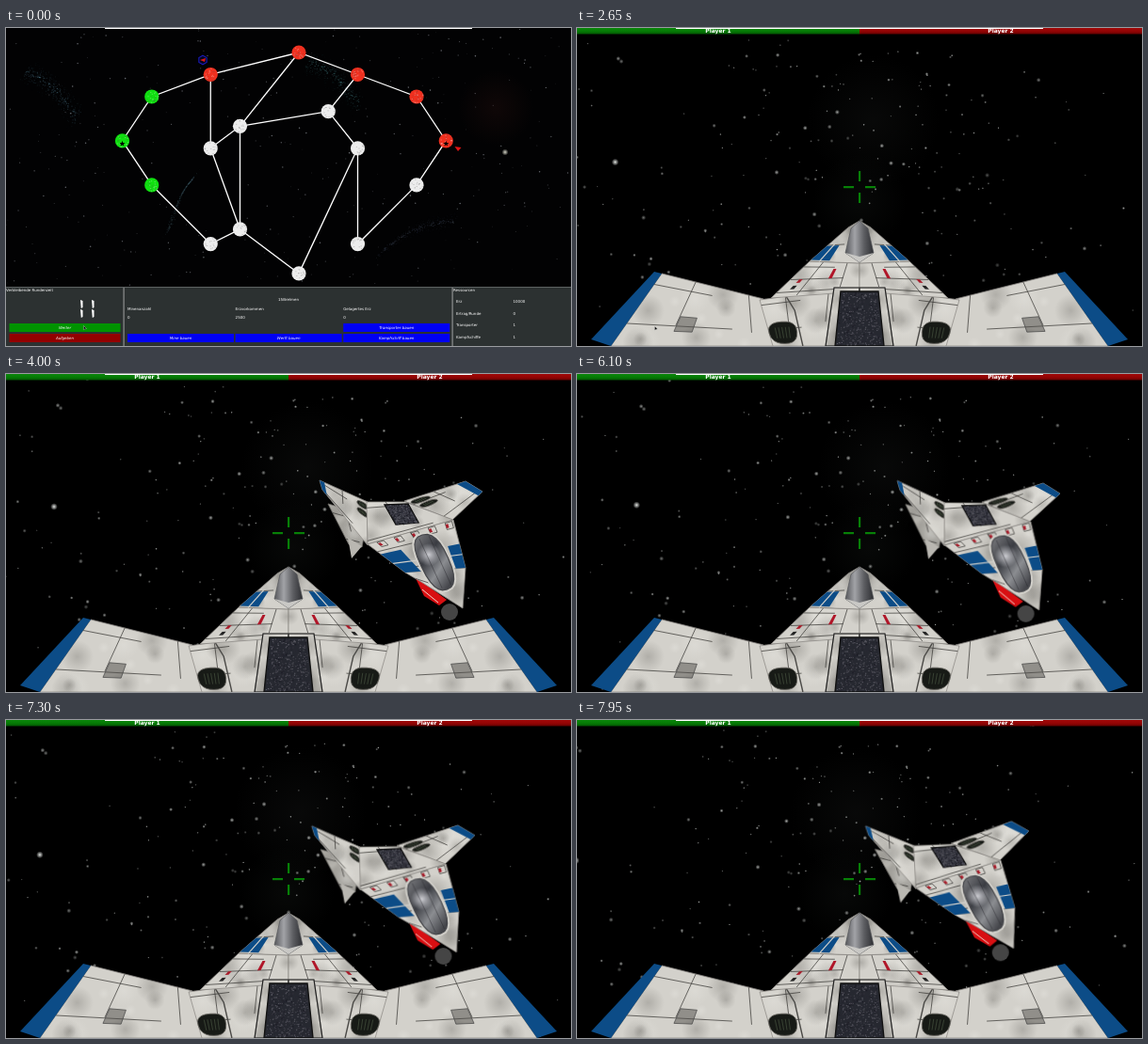
These frames come from a looping animation (600 by 338 pixels, 8 s). An HTML page with a canvas:

```html
<!DOCTYPE html>
<html lang="de">
<head>
<meta charset="utf-8">
<title>Raumschlacht</title>
<style>
html, body { margin: 0; width: 100%; height: 100%; overflow: hidden; background: #000; }
canvas { display: block; width: 600px; height: 338px; }
</style>
</head>
<body>
<canvas id="stage" width="600" height="338"></canvas>
<script>
const W = 600, H = 338, LOOP = 8000, FOCAL = 230;
const BLUE = '#0c4c87', HULL = '#d3d1cb', INK = '#33322f';
const ctx = document.getElementById('stage').getContext('2d');

// ---- helpers ----
function seeded(s) {
  return () => (s = (s * 16807) % 2147483647) / 2147483647;
}

function layer(draw) {
  const c = document.createElement('canvas');
  c.width = W;
  c.height = H;
  draw(c.getContext('2d'));
  return c;
}

function trace(g, p) {
  g.beginPath();
  for (let i = 0; i < p.length; i += 2) g.lineTo(p[i], p[i + 1]);
}

function poly(g, p, fill, stroke, width = 0.7) {
  trace(g, p);
  g.closePath();
  if (fill) { g.fillStyle = fill; g.fill(); }
  if (stroke) { g.strokeStyle = stroke; g.lineWidth = width; g.stroke(); }
}

function line(g, p, color = INK, width = 0.7) {
  trace(g, p);
  g.strokeStyle = color;
  g.lineWidth = width;
  g.stroke();
}

function rect(g, x, y, w, h, fill) {
  g.fillStyle = fill;
  g.fillRect(x, y, w, h);
}

function disc(g, x, y, r, fill) {
  g.fillStyle = fill;
  g.beginPath();
  g.arc(x, y, r, 0, 7);
  g.fill();
}

function glow(g, x, y, r, rgb, a) {
  const f = g.createRadialGradient(x, y, 0, x, y, r);
  f.addColorStop(0, `rgba(${rgb},${a})`);
  f.addColorStop(1, `rgba(${rgb},0)`);
  rect(g, x - r, y - r, 2 * r, 2 * r, f);
}

function fade(g, x0, y0, x1, y1, ...colors) {
  const f = g.createLinearGradient(x0, y0, x1, y1);
  colors.forEach((c, i) => f.addColorStop(i / (colors.length - 1), c));
  return f;
}

function text(g, s, x, y, align = 'left', font = '4px') {
  g.font = font + ' "DejaVu Sans", sans-serif';
  g.textAlign = align;
  g.textBaseline = 'middle';
  g.fillStyle = '#fff';
  g.fillText(s, x, y);
}

function radial(x, y, n, radius) {
  return Array.from({ length: n }, (_, i) => {
    const a = i * 2 * Math.PI / n - Math.PI / 2;
    return [x + radius(i) * Math.cos(a), y + radius(i) * Math.sin(a)];
  }).flat();
}

// ---- four-cornered plates, addressed by u (across) and v (down) ----
function at(q, u, v) {
  return [0, 1].map(k =>
    (q[k] * (1 - u) + q[k + 2] * u) * (1 - v) + (q[k + 6] * (1 - u) + q[k + 4] * u) * v);
}

function inset(q, u0, v0, u1, v1) {
  return [...at(q, u0, v0), ...at(q, u1, v0), ...at(q, u1, v1), ...at(q, u0, v1)];
}

function oval(q) {
  const soft = x => Math.sign(x) * Math.abs(x) ** 0.8 / 2 + 0.5;
  return Array.from({ length: 24 }, (_, i) => {
    const a = i * Math.PI / 12;
    return at(q, soft(Math.cos(a)), soft(Math.sin(a)));
  }).flat();
}

function plate(g, q, seed, seams = 3, fill = HULL) {
  const rnd = seeded(seed * 7919);
  poly(g, q, fill, fill, 0.6);
  g.save();
  trace(g, q);
  g.clip();
  for (let i = 0; i < 12; i++) {
    const [x, y] = at(q, rnd(), rnd());
    glow(g, x, y, 5 + rnd() * 14, i % 2 ? '95,93,88' : '238,237,232', 0.3);
  }
  for (let i = 0; i < seams; i++) {
    const k = (i + 0.3 + rnd() * 0.5) / seams, end = 0.5 + rnd() * 0.5;
    line(g, i % 2 ? [...at(q, k, 0), ...at(q, k, end)] : [...at(q, 0, k), ...at(q, end, k)]);
  }
  g.restore();
  poly(g, q, null, 'rgba(60,58,54,.6)', 0.6);
}

function metal(g, q, seed) {
  const rnd = seeded(seed);
  poly(g, q, '#262830', '#111', 1.4);
  for (let i = 0; i < 500; i++) {
    const [x, y] = at(q, 0.03 + rnd() * 0.92, 0.02 + rnd() * 0.95), v = 25 + rnd() * 70 | 0;
    rect(g, x, y, 1.3, 1.1, `rgb(${v},${v},${v + 9})`);
  }
}

function vent(g, q) {
  poly(g, oval(q), '#171a16', '#66645e', 0.9);
  for (let u = 0.25; u < 0.8; u += 0.12) line(g, [...at(q, u, 0.25), ...at(q, u, 0.75)], '#3c4636', 0.9);
}

// ---- map ----
const SHADES = ['#f0301f', '#10e010', '#ececec'];
// grid column, grid row, owner; routes are walks over the letters
const planets = Object.fromEntries(
  ('a6,0,0 b3,3,0 c8,3,0 d10,6,0 e11,12,0 f1,6,1 g0,12,1 h1,18,1 i4,10,2 j7,8,2 ' +
   'k3,13,2 l8,13,2 m10,18,2 n3,26,2 o4,24,2 p6,30,2 q8,26,2').split(' ').map(s => {
    const [col, row, owner] = s.slice(1).split(',');
    return [s[0], { x: 123.5 + col * 31.25, y: 26 + row * 7.83, color: SHADES[owner] }];
  }));
const routes = 'hgfbacdemqljikonh jc ai bk io opl'.split(' ');

function streak(g, rnd, x, y, dx, dy, rgb) {
  for (let i = 0; i < 420; i++) {
    const u = rnd(), s = (rnd() + rnd() - 1) * 13;
    rect(g, x + dx * u + s * 0.7, y + dy * u - 9 * Math.sin(u * Math.PI) - s, 1.2, 1,
      `rgba(${rgb},${(0.45 * rnd() * Math.exp(-Math.abs(s) / 5)).toFixed(2)})`);
  }
}

function drawPlanet(g, { x, y, color }, rnd) {
  disc(g, x, y, 7.6, color);
  for (let i = 0; i < 26; i++) {
    const a = rnd() * 6.28, r = 6.6 * Math.sqrt(rnd());
    rect(g, x + r * Math.cos(a), y + r * Math.sin(a), 1.3, 0.9,
      i % 2 ? 'rgba(255,255,255,.3)' : 'rgba(70,70,70,.25)');
  }
}

function button(g, x, y, color, label, w = 113) {
  rect(g, x, y, w, 9, color);
  text(g, label, x + w / 2, y + 4.7, 'center', 'italic 4px');
}

function panel(g) {
  rect(g, 0, 275, W, 63, '#2c3131');
  rect(g, 0, 275, W, 1, '#5d6262');
  for (const x of [124.5, 473.5]) rect(g, x, 276, 1.2, 62, '#8d9191');

  text(g, 'Verbleibende Rundenzeit', 0, 279);
  for (const x of [79, 91]) {
    for (const y of [289, 299]) poly(g, [x, y, x + 2.5, y + 1, x + 2.5, y + 8, x + 0.8, y + 9], '#fff');
  }
  button(g, 3.5, 314, '#009300', 'Weiter', 118);
  button(g, 3.5, 325, '#930000', 'Aufgeben', 118);

  text(g, '15Brelmen', 300, 289, 'center');
  const stats = ['Minenanzahl:0', 'Erzvorkommen:2500', 'Gelagertes Erz:0'];
  ['Mine bauen', 'Werft bauen', 'Kampfschiff bauen'].forEach((label, i) => {
    const x = 129 + i * 114.6;
    stats[i].split(':').forEach((s, row) => text(g, s, x, 298.5 + row * 9.5));
    button(g, x, 325, '#0000f4', label);
  });
  button(g, 358.2, 314, '#0000f4', 'Transporter bauen');

  text(g, 'Ressourcen', 475, 279);
  ['Erz:10000', 'Ertrag/Runde:0', 'Transporter:1', 'Kampfschiffe:1'].forEach((s, row) =>
    s.split(':').forEach((part, col) => text(g, part, 478 + col * 60.5, 291 + row * 12.6)));
}

function windowEdge(g) {
  rect(g, 105, 0, 390, 1, '#fff');
}

const mapLayer = layer(g => {
  const rnd = seeded(77);
  rect(g, 0, 0, W, H, '#020203');
  streak(g, rnd, 20, 46, 56, 50, '110,165,190');
  streak(g, rnd, 320, 36, 56, 48, '90,165,170');
  streak(g, rnd, 172, 215, 26, -55, '70,95,105');
  streak(g, rnd, 395, 240, 80, -35, '80,90,110');
  glow(g, 520, 85, 40, '75,30,25', 0.18);
  for (let i = 0; i < 330; i++) {
    disc(g, rnd() * W, rnd() * 275, 0.3 + rnd() * 0.5, `rgba(200,205,215,${(0.15 + rnd() * 0.4).toFixed(2)})`);
  }
  glow(g, 530, 132, 3.5, '235,235,220', 0.9);

  for (const walk of routes) line(g, [...walk].flatMap(k => [planets[k].x, planets[k].y]), '#fff', 1.3);
  for (const p of Object.values(planets)) drawPlanet(g, p, rnd);
  for (const k of 'ge') poly(g, radial(planets[k].x, 123, 10, i => i % 2 ? 1.3 : 3.2), '#000');
  poly(g, radial(209, 34, 6, () => 4.8), '#05051c', '#1a1ab8', 1.1);
  poly(g, [206, 34, 212, 32, 211, 36], '#d81818');
  poly(g, [476.5, 126, 483.5, 127, 480, 131], '#e01414');
  panel(g);
  windowEdge(g);
});

// ---- ships ----
function shipHalf(g) {
  const wing = [90, 261, 198, 288, 212, 338, 36, 338];
  const mid = [247, 248, 300, 250, 300, 280, 206, 287];
  const nacelle = [194, 289, 274, 278, 266, 338, 208, 338];
  const nose = [288, 212, 300, 205, 300, 250, 247, 248];
  const deck = [273, 276, 300, 276, 300, 338, 264, 338];

  plate(g, wing, 3, 4);
  poly(g, inset(wing, 0.34, 0.54, 0.46, 0.77), 'rgba(80,78,74,.5)', '#444');
  poly(g, [82, 259, 90, 261, 36, 338, 15, 331], BLUE);

  plate(g, nacelle, 5, 4);
  line(g, [...at(nacelle, 0.35, 0), ...at(nacelle, 0.45, 0.3), ...at(nacelle, 0.55, 1)], '#4b4a47', 1.4);
  vent(g, inset(nacelle, 0, 0.5, 0.46, 0.95));

  plate(g, mid, 8, 5);
  for (const v of [0.5, 0.68]) poly(g, inset(mid, 0.13, v, 0.18, v + 0.1), v < 0.6 ? '#a81c2a' : '#222');
  poly(g, inset(mid, 0.55, 0.2, 0.6, 0.5), '#b01528');

  plate(g, nose, 4, 1);
  poly(g, inset(nose, 0, 0.55, 0.38, 0.96), BLUE);
  line(g, [...at(nose, 0.19, 0.5), ...at(nose, 0.19, 1)], HULL, 1.2);

  plate(g, deck, 6, 0);
  poly(g, deck, null, '#222', 1.2);
}

const shipLayer = layer(g => {
  shipHalf(g);
  g.save();
  g.translate(W, 0);
  g.scale(-1, 1);
  shipHalf(g);
  g.restore();
  metal(g, [280, 280, 320, 280, 326, 338, 274, 338], 12);
  poly(g, [300, 205, 309, 213, 315, 239, 300, 249, 285, 239, 291, 213],
    fade(g, 285, 0, 315, 0, '#55565a', '#a2a3a7', '#5c5d61', '#2e2f33'), '#55565a');
  poly(g, [285, 239, 300, 243, 315, 239, 300, 249], '#c9c8c5');
});

const enemyLayer = layer(g => {
  const left = [333, 113, 384, 136, 384, 182, 336, 123];
  const right = [423, 135, 488, 114, 506, 125, 474, 155];
  const aft = [383, 136, 424, 136, 475, 155, 384, 181];
  const fore = [384, 181, 475, 155, 488, 206, 424, 211];

  disc(g, 471, 253, 9, '#454545');
  poly(g, [434, 215, 468, 240, 460, 246, 444, 236], '#d80f12');
  line(g, [442, 229, 459, 243], '#f4d0c8', 1);
  plate(g, [342, 138, 384, 150, 378, 184, 364, 181], 2, 3, '#aaa8a2');
  poly(g, [363, 174, 378, 183, 367, 196], '#b9b7b1');
  plate(g, left, 9, 3);
  plate(g, right, 11, 3);
  poly(g, inset(left, 0, 0, 0.1, 1), BLUE);
  poly(g, inset(right, 0.86, 0, 1, 1), BLUE);
  for (const v of [0.06, 0.25]) {
    vent(g, inset(left, 0.78, v, 1, v + 0.14));
    vent(g, inset(right, 0.02, v, 0.33, v + 0.15));
  }

  plate(g, aft, 13, 3);
  metal(g, [402, 139, 427, 138, 438, 158, 414, 160], 31);
  plate(g, fore, 15, 3);
  plate(g, [424, 211, 488, 206, 485, 249, 441, 221], 17, 1);
  for (let u = 0.1; u < 1; u += 0.2) {
    poly(g, inset(fore, u, 0.02, u + 0.08, 0.16), null, INK);
    poly(g, inset(fore, u, 0.05, u + 0.03, 0.13), '#a81c2a');
  }
  poly(g, inset(fore, 0, 0.35, 0.26, 1), BLUE);
  poly(g, inset(fore, 0.84, 0.5, 1, 1), BLUE);
  line(g, [...at(fore, 0, 0.68), ...at(fore, 1, 0.72)], HULL, 1.2);

  const glass = [427, 175, 457, 167, 482, 224, 455, 234];
  poly(g, oval(inset(glass, -0.08, -0.04, 1.08, 1.04)), HULL);
  poly(g, oval(glass), fade(g, 432, 185, 477, 215, '#6b6c70', '#3a3c42', '#8b8d91', '#45464b'), '#46474b', 1.2);
  glow(g, 449, 192, 12, '240,240,245', 0.8);
  for (const u of [0.35, 0.7]) line(g, [...at(glass, u, 0.05), ...at(glass, u, 0.95)], 'rgba(35,35,40,.6)');
});

// ---- battle ----
const rndSky = seeded(4242);
const sky = Array.from({ length: 340 }, () => ({
  a: (rndSky() - 0.5) * 2.1,
  e: (rndSky() - 0.5) * 1.3,
  r: 1.1 + rndSky() ** 3 * 1.5,
  v: 0.3 + rndSky() * 0.45
}));
sky.push({ a: Math.atan(-249 / FOCAL), e: -28 / Math.hypot(249, FOCAL), r: 3.8, v: 1 });

// time, yaw
const heading = [[2650, -0.02], [3650, 0], [6050, 0], [6100, 0.0246], [6700, 0], [7700, -0.0476], [7950, -0.092]];

function yawAt(t) {
  const i = Math.max(1, heading.findIndex(([end]) => t <= end));
  const [t0, y0] = heading[i - 1], [t1, y1] = heading[i];
  return y0 + (y1 - y0) * (t - t0) / (t1 - t0);
}

function crosshair(g) {
  for (const d of [-17, 6]) {
    rect(g, 300 + d, 168, 11, 2.2, '#078007');
    rect(g, 299, 169 + d, 2.2, 11, '#078007');
  }
}

function cursor(g, x, y) {
  poly(g, [x, y, x, y + 4.2, x + 1.2, y + 3.4, x + 3, y + 3], '#000', '#ddd', 0.4);
}

function battle(g, t) {
  const yaw = yawAt(t);
  rect(g, 0, 0, W, H, '#000');
  g.save();
  g.translate(300, 169);
  g.rotate(yaw * 0.42);
  glow(g, 20 + yaw * FOCAL, -70, 70, '40,43,42', 0.2);
  glow(g, 5 + yaw * FOCAL, 15, 50, '36,42,38', 0.2);
  for (const s of sky) {
    const a = s.a + yaw;
    glow(g, FOCAL * Math.tan(a), FOCAL * s.e / Math.cos(a), s.r, '225,228,225', s.v);
  }
  if (t >= 2700) g.drawImage(enemyLayer, -300 + yaw * 265, -169);
  g.restore();

  crosshair(g);
  g.drawImage(shipLayer, 0, 0);
  rect(g, 0, 0, 300, 6.5, fade(g, 0, 0, 0, 7, '#0a860a', '#057a05', '#045004'));
  rect(g, 300, 0, 300, 6.5, fade(g, 0, 0, 0, 7, '#a00808', '#920404', '#5e0202'));
  for (const n of [1, 2]) text(g, 'Player ' + n, n * 300 - 150, 3.4, 'center', 'bold 6px');
  windowEdge(g);
  if (t < 4000) cursor(g, 82.5, t < 3950 ? 317 : 312);
}

function frame(now) {
  const t = Math.floor((now % LOOP) / 50) * 50;
  if (t < 2650) {
    ctx.drawImage(mapLayer, 0, 0);
    cursor(ctx, 82.5, t < 500 ? 316.5 : 317);
  } else {
    battle(ctx, t);
  }
}

const start = performance.now();
function tick() {
  frame(performance.now() - start);
  requestAnimationFrame(tick);
}
tick();
</script>
</body>
</html>
```
